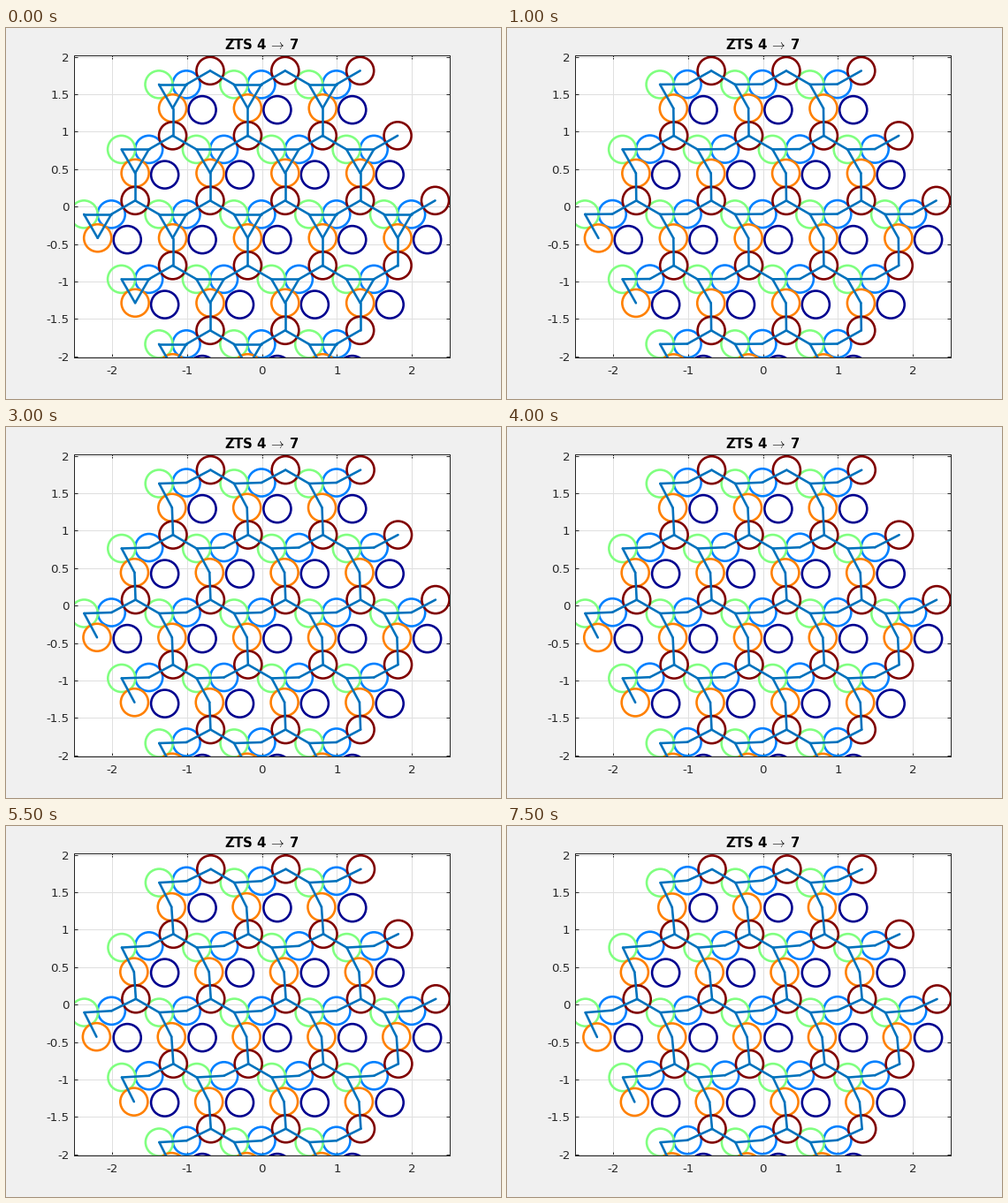
A matplotlib script that plays this animation: 560 px wide and 420 px high, repeating every 8000 ms.

```python
import numpy as np
import matplotlib.pyplot as plt
from matplotlib.animation import FuncAnimation
from matplotlib.collections import EllipseCollection, LineCollection

W, H, DPI = 560, 420, 100
FRAMES, INTERVAL = 16, 500
PX = 72 / DPI  # points per pixel
UNIT = 84.85   # pixels per data unit
CX, CY = 289.6, 202.2
INK = "#262626"

plt.rcParams["font.family"] = "DejaVu Sans"
plt.rcParams["mathtext.fontset"] = "cm"

BOND = 1 / (1 + np.sqrt(3))  # also the disk diameter
UP = np.array([0.5, np.sqrt(3) / 2])
RIGHT = np.array([1.0, 0.0])
STRETCH = 0.05  # imposed growth of the cut bond over the loop

GREEN = np.array([-0.374, -0.102])
REST = {
    "green": GREEN,
    "blue": GREEN + BOND * RIGHT,
    "orange": GREEN + BOND * UP * [1, -1],
    "red": GREEN + [(1 + BOND) / 2, BOND / 2],
}
RATTLER = np.array([0.204, -0.441])

COLORS = {
    "rattler": (0, 0, 0.56),
    "blue": (0, 0.5, 1),
    "green": (0.5, 1, 0.5),
    "orange": (1, 0.5, 0),
    "red": (0.5, 0, 0),
}

# hexagonal patch of lattice cells, keyed by (i, j)
CELLS = {
    (i, j): i * RIGHT + j * UP
    for j in range(2, -3, -1)
    for i in range(-2, 3)
    if abs(i + j) <= 2
}
ORIGINS = np.array(list(CELLS.values()))

# bonds as (disk, disk, cell step of the second disk)
BONDS = [
    ("green", "blue", (0, 0)),
    ("green", "orange", (0, 0)),
    ("blue", "red", (0, 0)),
    ("red", "green", (1, 0)),
    ("red", "orange", (0, 1)),
]
CUT_BOND = ("blue", "orange", (0, 0))
ALL_BONDS = BONDS + [CUT_BOND]


def stretch_mode():
    """Least-squares displacement of each disk for unit growth of the cut bond."""
    names = list(REST)
    compat = np.zeros((len(ALL_BONDS), len(names), 2))
    for row, (a, b, (di, dj)) in zip(compat, ALL_BONDS):
        d = REST[b] + di * RIGHT + dj * UP - REST[a]
        d /= np.hypot(*d)
        row[names.index(a)] -= d
        row[names.index(b)] += d
    growth = np.zeros(len(ALL_BONDS))
    growth[-1] = 1
    inverse = np.linalg.pinv(compat.reshape(len(ALL_BONDS), -1), rcond=1e-6)
    return dict(zip(names, (inverse @ growth).reshape(-1, 2)))


MODE = stretch_mode()


def pose(k):
    amount = STRETCH * k / (FRAMES - 1)
    disks = {name: p + amount * MODE[name] for name, p in REST.items()}
    disks["rattler"] = RATTLER
    return disks


def segments(disks, bonds):
    out = []
    for (i, j), origin in CELLS.items():
        for a, b, (di, dj) in bonds:
            other = CELLS.get((i + di, j + dj))
            if other is not None:
                out.append([origin + disks[a], other + disks[b]])
    return out


fig = plt.figure(figsize=(W / DPI, H / DPI), dpi=DPI, facecolor="#f0f0f0")
half_w, half_h = 212.2, 171
ax = fig.add_axes([(CX - half_w) / W, 1 - (CY + half_h) / H,
                   2 * half_w / W, 2 * half_h / H])
ax.set_xlim(-half_w / UNIT, half_w / UNIT)
ax.set_ylim(-half_h / UNIT, half_h / UNIT)
xticks = np.arange(-2, 3)
yticks = np.arange(-2, 2.5, 0.5)
ax.set_xticks(xticks)
ax.set_yticks(yticks)
ax.set_axisbelow(True)
ax.grid(color="#dfdfdf", linewidth=PX)
ax.tick_params(direction="in", length=4.25 * PX, width=PX, color=INK,
               top=True, right=True, labelbottom=False, labelleft=False)
for spine in ax.spines.values():
    spine.set(color=INK, linewidth=PX)


def label(x, y, text, ha="center", size=13.33, **kw):
    fig.text(x / W, 1 - y / H, text, ha=ha, va="baseline",
             fontsize=size * PX, **kw)


for x in xticks:
    label(CX + UNIT * x, 391.5, f"{x:g}", color=INK)
for y in yticks:
    label(71.5, CY - UNIT * y + 5, f"{y:g}", ha="right", color=INK)
label(CX, 24, r"ZTS 4 $\!\rightarrow\!$ 7", size=14.85, weight="bold",
      color="black")

rings = {}
for name, color in COLORS.items():
    n = len(ORIGINS)
    rings[name] = EllipseCollection(
        [BOND] * n, [BOND] * n, [0] * n, units="xy", offsets=ORIGINS,
        offset_transform=ax.transData, facecolors="none", edgecolors=[color],
        linewidths=2.6 * PX, zorder=2)
    ax.add_collection(rings[name], autolim=False)

lines = LineCollection([], colors="#0072bd", linewidths=2.6 * PX,
                       capstyle="round", zorder=2.2)
ax.add_collection(lines, autolim=False)


def update(k):
    disks = pose(k)
    for name, ring in rings.items():
        ring.set_offsets(ORIGINS + disks[name])
    lines.set_segments(segments(disks, ALL_BONDS if k == 0 else BONDS))
    return [*rings.values(), lines]


anim = FuncAnimation(fig, update, frames=FRAMES, interval=INTERVAL,
                     repeat=True, repeat_delay=0)
plt.show()
```
